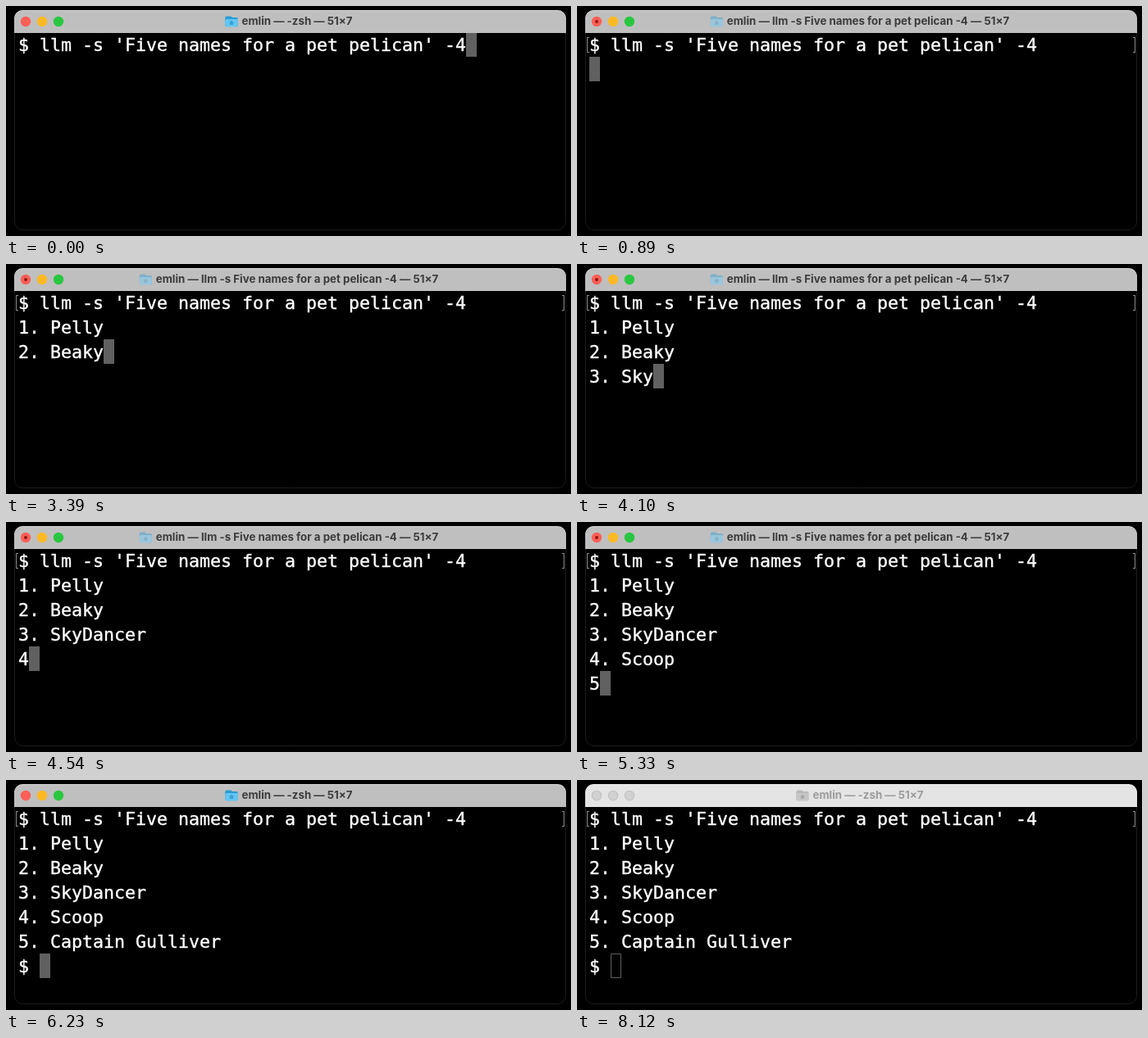
These frames come from a looping animation (689 px wide and 281 px high, 8.14 s). An HTML page with a canvas:

```html
<!DOCTYPE html>
<html lang="en">
<head>
<meta charset="utf-8">
<title>Terminal</title>
<style>
html, body { margin: 0; width: 100%; height: 100%; overflow: hidden; background: #000; }
canvas { display: block; width: 689px; height: 281px; }
</style>
</head>
<body>
<canvas id="stage"></canvas>
<script>
const W = 689, H = 281, LOOP = 8140;
const CELL = 13, ROW = 30, LEFT = 15, TOP = 32;
const MONO = '21.6px "DejaVu Sans Mono", monospace';
const SANS = '700 13.3px Inter, sans-serif';
const USER = 'emlin';
const COMMAND = "$ llm -s 'Five names for a pet pelican' -4";

// Output chunks with the time each one arrives
const chunks = [
  [800, '\n'], [2240, '1.'], [2420, ' Pel'], [2500, 'ly'], [2590, '\n'],
  [2770, '2'], [2860, '.'], [3040, ' Be'], [3390, 'aky'], [3660, '\n'],
  [3830, '3'], [4010, '.'], [4100, ' Sky'], [4270, 'D'], [4360, 'ancer'],
  [4450, '\n'], [4540, '4'], [4710, '.'], [4800, ' Sco'], [4980, 'op'],
  [5150, '\n'], [5330, '5'], [5510, '. Captain'], [5690, ' G'], [5780, 'ull'],
  [5960, 'iver'], [6140, '\n$ ']
];

const canvas = document.getElementById('stage');
const ctx = canvas.getContext('2d');
const dpr = window.devicePixelRatio || 1;
canvas.width = W * dpr;
canvas.height = H * dpr;
ctx.scale(dpr, dpr);

function rect(x, y, w, h, color) {
  ctx.fillStyle = color;
  ctx.fillRect(x, y, w, h);
}

function disc(x, y, r, color) {
  ctx.fillStyle = color;
  ctx.beginPath();
  ctx.arc(x, y, r, 0, Math.PI * 2);
  ctx.fill();
}

function box(x, y, w, h, r, color) {
  ctx.fillStyle = color;
  ctx.beginPath();
  ctx.roundRect(x, y, w, h, r);
  ctx.fill();
}

function drawFrame(busy, active) {
  rect(0, 0, W, H, '#000');
  ctx.strokeStyle = '#1c1c1c';
  ctx.lineWidth = 1;
  ctx.beginPath();
  ctx.roundRect(10.5, 5.5, 672, 268, 10);
  ctx.stroke();
  const corners = [10, 10, 0, 0];
  box(10, 5, 673, 28, corners, active ? '#d6d6d6' : '#f0f0f0');
  box(10, 6, 673, 27, corners, active ? '#bfbfbf' : '#e4e4e4');
  const lights = ['#fe5f57', '#fdb924', '#29c740'];
  lights.forEach((color, i) => {
    const x = 24 + i * 20;
    disc(x, 19, 6.2, active ? color : '#bdbdbd');
    if (!active) disc(x, 19, 5.4, '#d0d0d0');
  });
  if (busy) disc(24, 19, 2, '#8e1510');
}

function drawFolder(x, colors) {
  const [back, front, mark] = colors;
  box(x, 12.5, 8, 5, 1.5, back);
  box(x, 14, 15, 11, 1.5, back);
  box(x, 16, 15, 9.5, 1.5, front);
  rect(x + 5.5, 20, 4, 3, mark);
  ctx.beginPath();
  ctx.moveTo(x + 4.5, 20.5);
  ctx.lineTo(x + 7.5, 17.5);
  ctx.lineTo(x + 10.5, 20.5);
  ctx.fill();
}

function drawTitle(busy, active) {
  const job = busy ? 'llm -s Five names for a pet pelican -4' : '-zsh';
  const text = `${USER} — ${job} — 51×7`;
  ctx.font = SANS;
  const width = ctx.measureText(text).width;
  const x = 345 - (width + 20) / 2;
  const colors = !active ? ['#b9b9b9', '#c6c6c6', '#aaa']
    : busy ? ['#7fafc8', '#9ac6dc', '#88b4ca']
    : ['#2a9bd3', '#62c6f2', '#3a9fd2'];
  drawFolder(x, colors);
  ctx.fillStyle = active ? '#3c3c3c' : '#9c9c9c';
  ctx.fillText(text, x + 20, 23);
}

function drawMarks() {
  for (const [x, edge] of [[12, 12], [678, 680]]) {
    rect(edge, 38, 1, 19, '#8a8a8a');
    rect(x, 38, 3, 1, '#8a8a8a');
    rect(x, 56, 3, 1, '#8a8a8a');
  }
}

function drawCursor(col, row, active) {
  const x = LEFT + col * CELL, y = TOP + row * ROW;
  if (active) {
    const top = Math.max(y, 33);
    rect(x, top, CELL, y + ROW - top, '#606060');
    return;
  }
  ctx.strokeStyle = '#606060';
  ctx.lineWidth = 1;
  ctx.strokeRect(x + 0.5, y + 0.5, CELL - 1, ROW - 1);
}

function drawLines(lines) {
  ctx.font = MONO;
  ctx.fillStyle = ctx.strokeStyle = '#fff';
  ctx.lineWidth = 0.4;
  ctx.lineJoin = 'round';
  lines.forEach((line, i) => {
    const y = TOP + 23 + i * ROW;
    ctx.fillText(line, LEFT, y);
    ctx.strokeText(line, LEFT, y);
  });
}

function draw(t) {
  const active = t < 8120;
  const busy = t >= 890 && t < 6230;
  let text = COMMAND;
  for (const [at, part] of chunks) if (t >= at) text += part;
  const lines = text.split('\n');
  const last = lines.length - 1;

  drawFrame(busy, active);
  drawTitle(busy, active);
  if (t >= 800) drawMarks();
  drawCursor(lines[last].length, last, active);
  drawLines(lines);
}

const start = performance.now();
function tick() {
  draw((performance.now() - start) % LOOP);
  requestAnimationFrame(tick);
}
tick();
</script>
</body>
</html>
```
